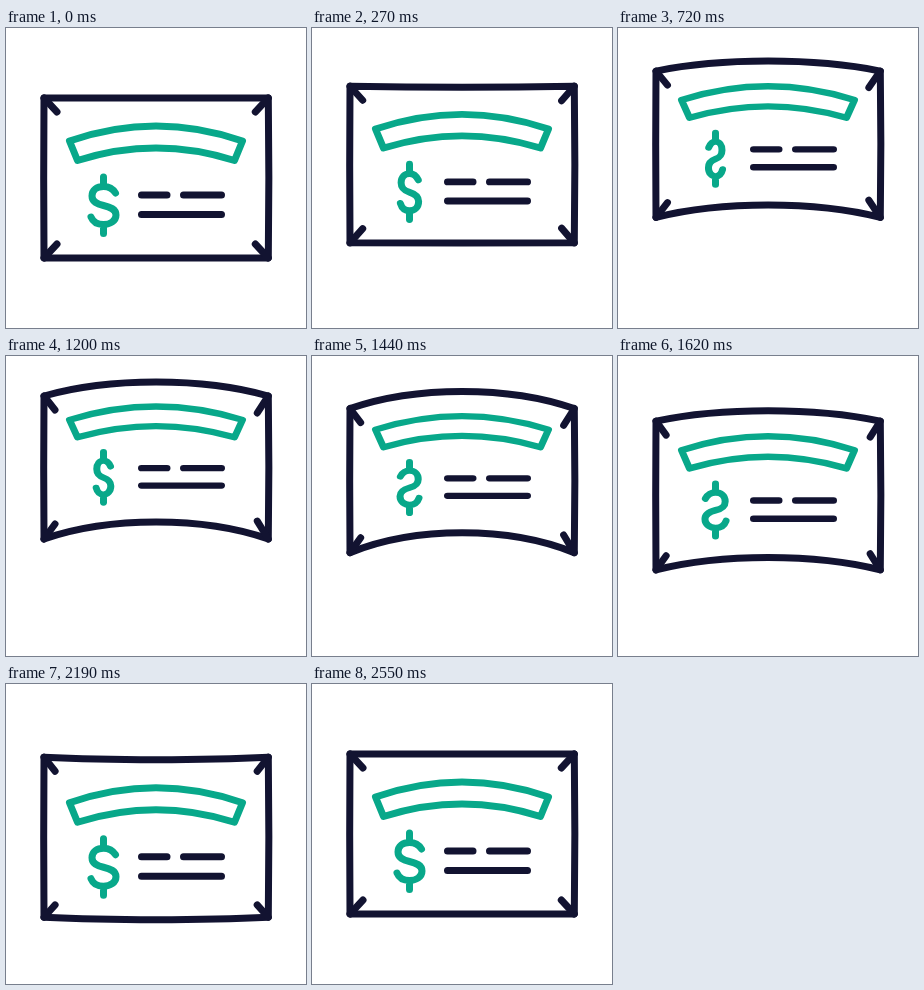
Write an HTML page that moves like this. It is 300x300 px and loops after 4580 ms.

```html
<!DOCTYPE html>
<html lang="en">
<head>
<meta charset="utf-8">
<title>Waving cheque</title>
<style>
  html, body { margin: 0; width: 100%; height: 100%; overflow: hidden; background: #fff; }
  svg { display: block; width: 100%; height: 100%; }
  path { fill: none; stroke: #121331; stroke-width: 7; stroke-linecap: round; stroke-linejoin: round; }
  .green { stroke: #08a88a; }
</style>
</head>
<body>
<svg viewBox="0 0 300 300">
  <path id="card"/>
  <path id="ticks"/>
  <g id="content">
    <path class="green" d="M63.5,113 Q150,83 236.5,113 L228.5,132.5 Q150,107.5 71.5,132.5 Z"/>
    <path d="M135.5,167 H161 M177.5,167 H215.5 M135.5,186.5 H215.5"/>
    <path id="dollar" class="green"/>
  </g>
</svg>
<script>
const LOOP = 4580, STEP = 30;
const LEFT = 38, RIGHT = 262.3, HEIGHT = 160, COIN_X = 97.5;

// Pairs are x offset from the coin's axis, y
const DOLLAR = 'M12,165 C9.5,161 5.5,158.5 0,158.5 C-6.5,158.5 -11.5,162 -11.5,168 ' +
  'C-11.5,174 -6.5,176 0,177.5 C6.5,179 12.5,181 12.5,187 ' +
  'C12.5,193 6.5,196.5 0,196.5 C-6.5,196.5 -10.5,194 -12.5,189 ' +
  'M0,149 V158 M0,197 V205.5';

const $ = id => document.getElementById(id);

// Cosine ease; power below 1 runs early, above 1 runs late
function ease(t, from, to, power = 1) {
  const x = Math.min(1, Math.max(0, (t - from) / (to - from)));
  return (1 - Math.cos(Math.PI * x ** power)) / 2;
}

// Rise to the high pose, drop past rest to the low pose, settle
function sway(t, rest, high, low, rise = 1, drop = 1) {
  return rest +
    (high - rest) * ease(t, 0, 1050, rise) +
    (low - high) * ease(t, 1200, 1950, drop) +
    (rest - low) * ease(t, 1950, 2550, 0.82);
}

function edge(x1, x2, y, mid) {
  const inset = (x2 - x1) * 0.29, cy = y + (mid - y) * 4 / 3;
  return `C${x1 + inset},${cy} ${x2 - inset},${cy} ${x2},${y} `;
}

const tick = (x, y, dx, dy) => `M${x},${y} l${dx},${dy} `;

function draw(t) {
  // The corners lead, the middle of the sheet follows
  const top = sway(t, 70, 40, 76, 0.62, 0.8);
  const mid = sway(t, 70, 26, 80.5, 0.81, 1.14);
  const squash = sway(t, 1, 0.894, 1, 0.9, 1.6);
  const bend = 28 * (1 - squash);
  const bottom = top + HEIGHT * squash;
  const lowMid = mid + HEIGHT * squash - bend;
  const centre = (top + bottom) / 2;

  $('card').setAttribute('d', `M${LEFT},${top} ` + edge(LEFT, RIGHT, top, mid) +
    `Q263.4,${centre} ${RIGHT},${bottom} ` + edge(RIGHT, LEFT, bottom, lowMid) +
    `Q37.4,${centre} ${LEFT},${top} Z`);

  const dx = sway(t, 13, 11, 9.5), low = sway(t, 14, 15, 11, 1, 2);
  $('ticks').setAttribute('d',
    tick(LEFT, top, dx, 14) + tick(RIGHT, top, -dx, 14 + bend) +
    tick(LEFT, bottom, dx, -low) + tick(RIGHT, bottom, -dx, -low - bend));

  $('content').setAttribute('transform',
    `translate(0 ${mid - 5 - 65 * squash}) scale(1 ${squash})`);

  // Two overlapping full turns
  const turn = Math.cos(2 * Math.PI * (ease(t, 0, 1200) + ease(t, 850, 2230)));
  $('dollar').setAttribute('d', DOLLAR.replace(/(-?[\d.]+),/g,
    (_, x) => (COIN_X + x * turn).toFixed(2) + ','));
}

const start = performance.now();
function play() {
  const t = (performance.now() - start) % LOOP;
  draw(Math.floor(t / STEP) * STEP);
  requestAnimationFrame(play);
}
play();
</script>
</body>
</html>
```
